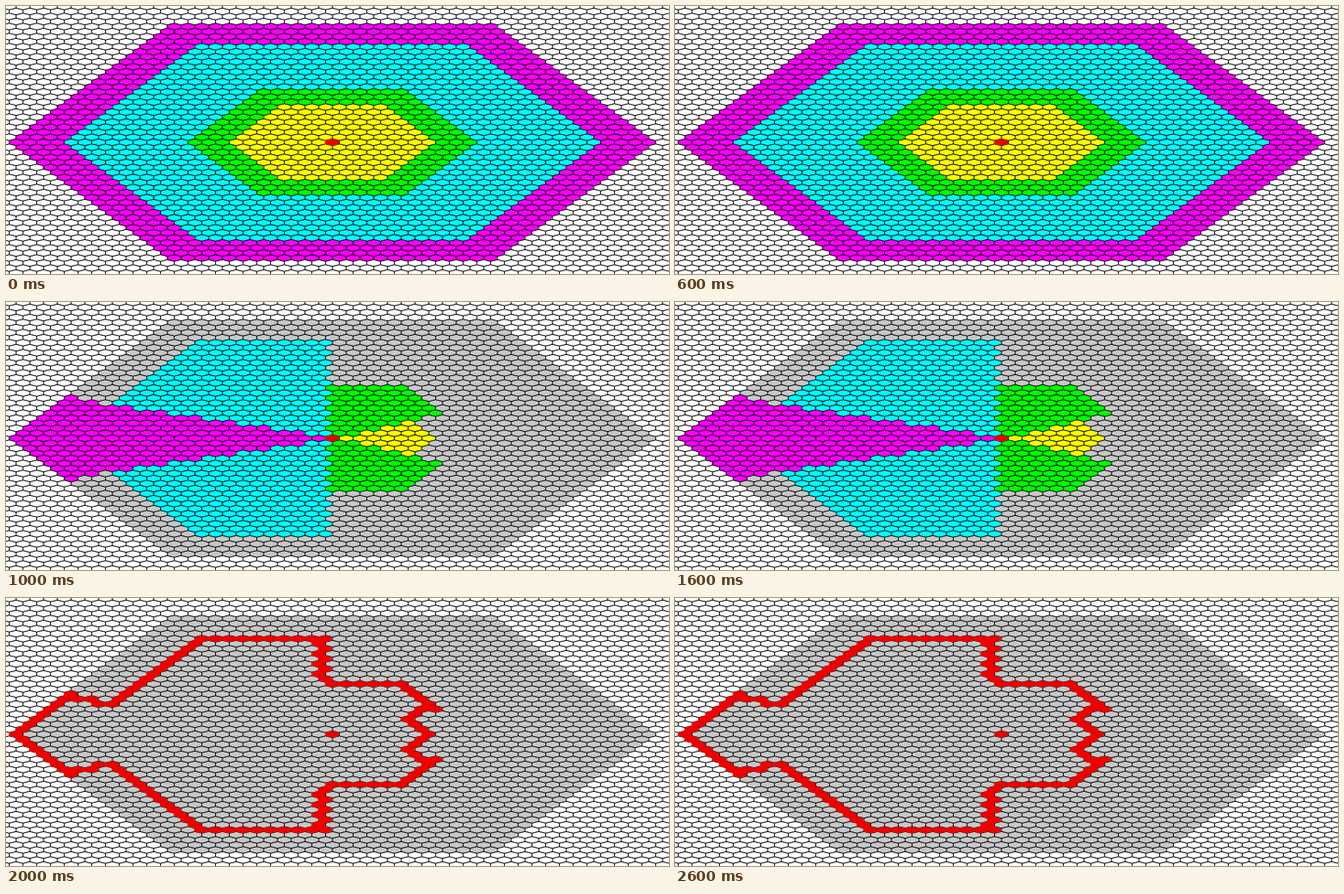
Animation, 723 px wide and 293 px high, one loop 3 s. Source, as an HTML page with a canvas:

```html
<!DOCTYPE html>
<html lang="en">
<head>
<meta charset="utf-8">
<title>Hex field of view</title>
<style>
html, body { margin: 0; width: 100%; height: 100%; overflow: hidden; background: #fff; }
canvas { display: block; }
</style>
</head>
<body>
<canvas width="723" height="293"></canvas>
<script>
const ctx = document.querySelector('canvas').getContext('2d');
const CELL = 15, PITCH = 5.5, SIDE = PITCH / 1.5, CX = 355.5, CY = 149;
const WHITE = '#fff', GREY = '#c8c8c8', RED = '#e00', LINE = 'rgba(0, 0, 0, .6)';
const FRONT = '#f0f', SIDES = '#0ff', BACK = '#0f0', REAR = '#ff0';
const RANGE = { [FRONT]: 23, [SIDES]: 19, [BACK]: 10, [REAR]: 7 };
const STEPS = [[-1, 0], [1, 0], [-.5, -1], [.5, -1], [-.5, 1], [.5, 1]];

// Cells are addressed by column (halves on odd rows) and row, relative to the centre.
const cells = [];
for (let r = -28; r <= 28; r++) {
  for (let q = (r & 1) / 2 - 25; q < 26; q++) cells.push([q, r]);
}

const distance = (q, r) => Math.max(Math.abs(r), Math.abs(q) + Math.abs(r) / 2);

function rings(q, r) {
  const d = distance(q, r);
  if (d === 0) return RED;
  return [REAR, BACK, SIDES, FRONT].find(c => d <= RANGE[c]) || WHITE;
}

function sectors(q, r) {
  const d = distance(q, r), slope = Math.abs(r / q);
  if (d === 0) return RED;
  if (d > RANGE[FRONT]) return WHITE;
  const arc = q < 0 ? (slope < .422 ? FRONT : SIDES) : (slope < .6 ? REAR : BACK);
  return d <= RANGE[arc] ? arc : GREY;
}

const visible = (q, r) => ![WHITE, GREY].includes(sectors(q, r));

function outline(q, r) {
  const edge = visible(q, r) && STEPS.some(([a, b]) => !visible(q + a, r + b));
  if (edge || distance(q, r) === 0) return RED;
  return distance(q, r) <= RANGE[FRONT] ? GREY : WHITE;
}

function hexes(list) {
  const path = new Path2D();
  for (const [q, r] of list) {
    const x = CX + q * CELL, y = CY + r * PITCH, w = CELL / 2, h = SIDE / 2;
    path.moveTo(x, y - SIDE);
    path.lineTo(x + w, y - h);
    path.lineTo(x + w, y + h);
    path.lineTo(x, y + SIDE);
    path.lineTo(x - w, y + h);
    path.lineTo(x - w, y - h);
    path.closePath();
  }
  return path;
}

const grid = hexes(cells);

function drawScene(colorOf) {
  const paint = color => {
    ctx.fillStyle = color;
    ctx.fill(hexes(cells.filter(([q, r]) => colorOf(q, r) === color)));
  };
  ctx.fillStyle = WHITE;
  ctx.fillRect(0, 0, 723, 293);
  [GREY, FRONT, SIDES, BACK, REAR].forEach(paint);
  ctx.save();
  ctx.translate(.5, 0); // keeps the upright lines on whole pixels
  ctx.strokeStyle = LINE;
  ctx.stroke(grid);
  ctx.restore();
  paint(RED);
}

const scenes = [rings, sectors, outline];
let shown = -1;

function tick() {
  const scene = Math.floor(performance.now() % 3000 / 1000);
  if (scene !== shown) drawScene(scenes[shown = scene]);
  requestAnimationFrame(tick);
}
tick();
</script>
</body>
</html>
```
